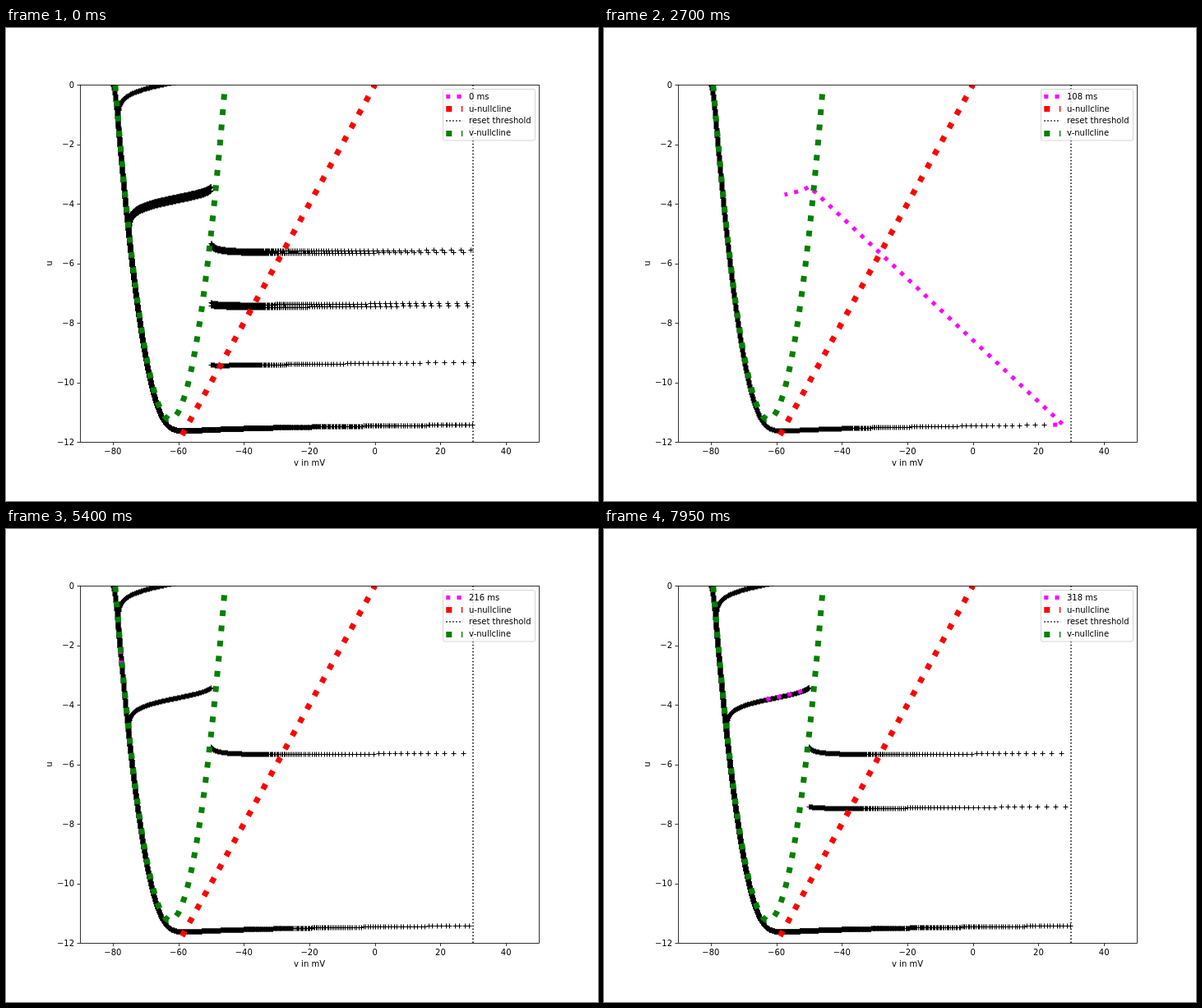
Write an HTML page with a canvas that moves like this. It is 720x576 px and loops after 8 s.

```html
<!DOCTYPE html>
<html lang="en">
<head>
<meta charset="utf-8">
<title>Phase plane of a spiking neuron</title>
<style>
  html, body { margin: 0; width: 100%; height: 100%; overflow: hidden; background: #fff; }
  canvas { display: block; }
</style>
</head>
<body>
<canvas id="stage" width="720" height="576"></canvas>
<script>
const ctx = document.getElementById('stage').getContext('2d');

const AXES = { left: 90, right: 648, top: 69.12, bottom: 504 };
const FRAME_MS = 50, FRAME_COUNT = 160, MS_PER_FRAME = 2;
const STEPS_PER_FRAME = 200, DT = MS_PER_FRAME / STEPS_PER_FRAME;
const TOTAL_MS = 450, INPUT = 5, THRESHOLD = 30, RESET_V = -50;

const px = v => AXES.left + (v + 90) / 140 * (AXES.right - AXES.left);
const py = u => AXES.top - u / 12 * (AXES.bottom - AXES.top);
const vNullcline = v => 0.04 * v * v + 5 * v + 140 + INPUT;
const uNullcline = v => 0.2 * v;

// Izhikevich neuron, Euler steps; the reset jump of u shrinks from 8 to 2 over time.
function simulate() {
  const path = [];
  let v = -80, u = 0;
  for (let i = 0; i < TOTAL_MS / DT; i++) {
    path.push([px(v), py(u)]);
    const dv = vNullcline(v) - u, du = 0.02 * (uNullcline(v) - u);
    v += DT * dv;
    u += DT * du;
    if (v >= THRESHOLD) {
      const t = i * DT;
      v = RESET_V;
      u += t < 150 ? 8 : t < 250 ? 6 : t < 350 ? 4 : 2;
    }
  }
  return path;
}

function sample(from, to, fn) {
  const points = [];
  for (let v = from; v <= to; v++) points.push([px(v), py(fn(v))]);
  return points;
}

const trajectory = simulate();
const greenLine = sample(-80, -40, vNullcline);
// The dash pattern of the red line begins one pixel below the stage.
const uStart = -(577 - AXES.top) / (AXES.bottom - AXES.top) * 12;
const redLine = [[px(uStart * 5), 577], [px(0), py(0)]];
const thresholdLine = [[568, AXES.bottom], [568, AXES.top]];

function dotted(points, color, width) {
  ctx.beginPath();
  for (const [x, y] of points) ctx.lineTo(x, y);
  ctx.strokeStyle = color;
  ctx.lineWidth = width;
  ctx.setLineDash([width, width * 1.65]);
  ctx.stroke();
  ctx.setLineDash([]);
}

// Plus markers snapped to whole pixels.
function plusMarkers(points) {
  let lastX, lastY;
  ctx.fillStyle = '#000';
  for (const point of points) {
    const x = Math.round(point[0]), y = Math.round(point[1]);
    if (x === lastX && y === lastY) continue;
    ctx.fillRect(x - 2.5, y, 6, 1);
    ctx.fillRect(x, y - 2.5, 1, 6);
    lastX = x;
    lastY = y;
  }
}

function text(str, x, y, align = 'left') {
  ctx.fillStyle = '#000';
  ctx.textAlign = align;
  ctx.fillText(str, x, y);
}

const tickLabel = n => String(n).replace('-', '\u2212');

function drawAxes() {
  ctx.strokeStyle = '#000';
  ctx.lineWidth = 0.8;
  ctx.strokeRect(90.5, 69.5, 558, 435);
  ctx.fillStyle = '#000';
  for (let v = -80; v <= 40; v += 20) {
    ctx.fillRect(Math.round(px(v)) + 0.1, 504.5, 0.8, 3.5);
    text(tickLabel(v), px(v), 519, 'center');
  }
  for (let u = 0; u >= -12; u -= 2) {
    ctx.fillRect(86.5, Math.round(py(u)) + 0.1, 3.5, 0.8);
    text(tickLabel(u), 83, Math.round(py(u) + 3.6), 'right');
  }
  text('v in mV', 369, 533, 'center');
  ctx.save();
  ctx.translate(56, 286.5);
  ctx.rotate(-Math.PI / 2);
  text('u', 0, 0, 'center');
  ctx.restore();
}

function drawLegend(label) {
  ctx.beginPath();
  ctx.roundRect(531.5, 74.5, 112, 62.5, 2);
  ctx.fillStyle = 'rgba(255,255,255,0.8)';
  ctx.fill();
  ctx.strokeStyle = 'rgba(204,204,204,0.8)';
  ctx.lineWidth = 1;
  ctx.stroke();
  const rows = [
    [label, 'magenta', 5, 83.5, 87],
    ['u-nullcline', 'red', 7, 98.5, 102],
    ['reset threshold', 'black', 1.5, 113, 116],
    ['v-nullcline', 'green', 7, 128.5, 131],
  ];
  for (const [name, color, width, lineY, baseline] of rows) {
    dotted([[535.3, lineY], [555.3, lineY]], color, width);
    text(name, 563, baseline);
  }
}

function draw(frame) {
  ctx.fillStyle = '#fff';
  ctx.fillRect(0, 0, 720, 576);
  ctx.font = '10px "DejaVu Sans", sans-serif';

  ctx.save();
  ctx.beginPath();
  ctx.rect(90, 69, 558, 435);
  ctx.clip();
  // Frame 0 shows the whole run; later ones the past plus the newest 2 ms.
  const head = (frame - 1) * STEPS_PER_FRAME;
  plusMarkers(trajectory.slice(0, head));
  if (frame > 0) dotted(trajectory.slice(head, head + STEPS_PER_FRAME), 'magenta', 5);
  dotted(redLine, 'red', 7);
  dotted(thresholdLine, 'black', 1.5);
  dotted(greenLine, 'green', 7);
  ctx.restore();

  drawAxes();
  drawLegend(frame * MS_PER_FRAME + ' ms');
}

let shown = -1;
const start = performance.now();
function tick() {
  const frame = Math.floor((performance.now() - start) / FRAME_MS) % FRAME_COUNT;
  if (frame !== shown) draw(shown = frame);
  requestAnimationFrame(tick);
}
tick();
</script>
</body>
</html>
```
